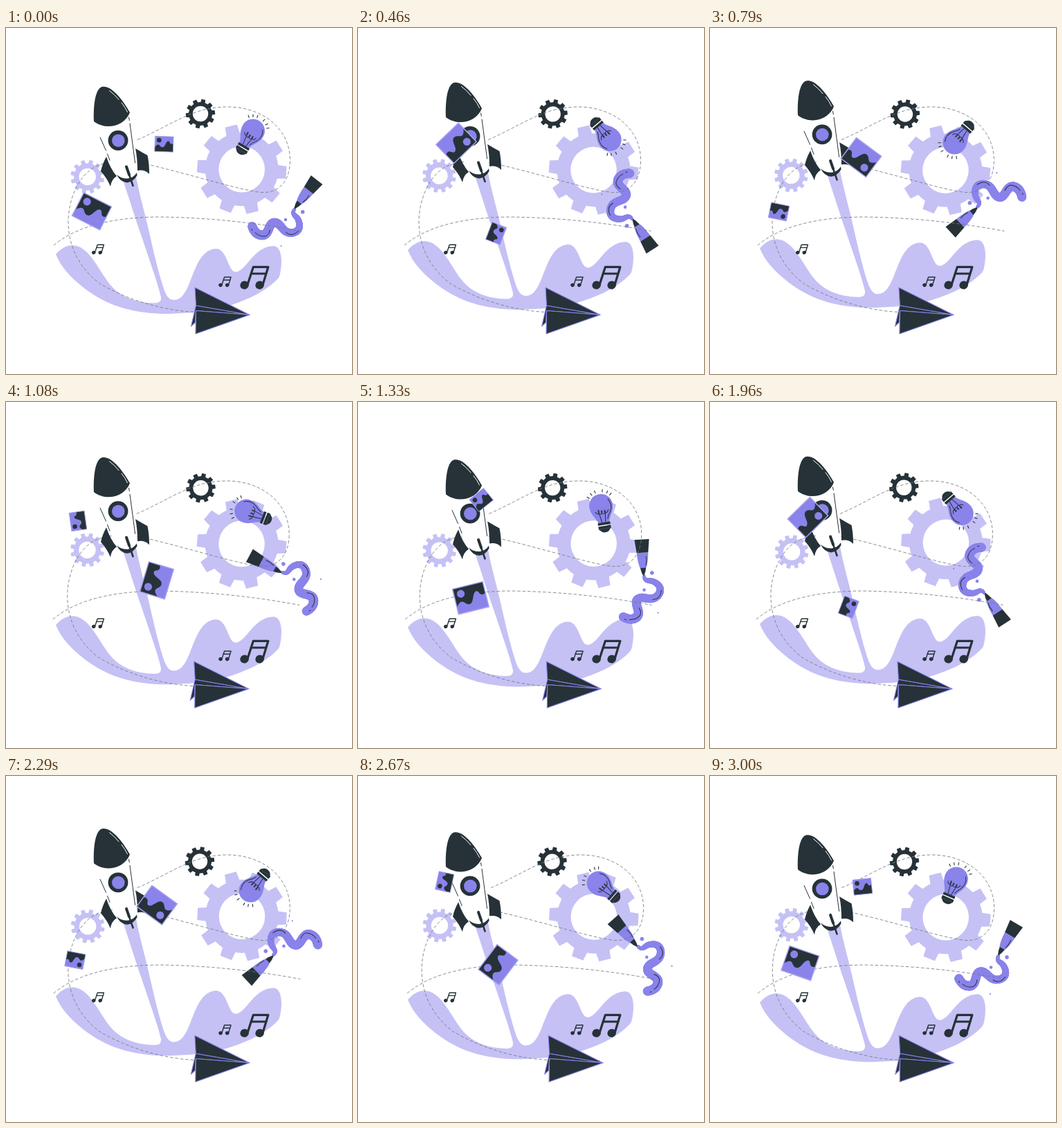
An HTML page with a canvas that plays this animation: 500x500 px, repeating every 3040 ms.

```html
<!DOCTYPE html>
<html lang="en">
<head>
<meta charset="utf-8">
<title>Creative rocket</title>
<style>
html, body { margin: 0; width: 100%; height: 100%; overflow: hidden; background: #fff; }
canvas { display: block; width: 500px; height: 500px; }
</style>
</head>
<body>
<canvas id="stage" width="500" height="500"></canvas>
<script>
const ctx = document.getElementById('stage').getContext('2d');
const DARK = '#263238', PURPLE = '#8a83ea', PALE = '#c5c1f5', WHITE = '#fff';
const LOOP = 3040, STEP = 1000 / 24, LAST = 72, TAU = Math.PI * 2;
const START = 0.02; // cycle position when the loop begins

function fill(d, color) {
  ctx.fillStyle = color;
  ctx.fill(new Path2D(d));
}
function line(d, color, width, cap = 'round') {
  ctx.strokeStyle = color;
  ctx.lineWidth = width;
  ctx.lineCap = cap;
  ctx.lineJoin = 'round';
  ctx.stroke(new Path2D(d));
}
function dot(x, y, r, color) {
  ctx.fillStyle = color;
  ctx.beginPath();
  ctx.arc(x, y, r, 0, TAU);
  ctx.fill();
}
function group(draw, x, y, deg = 0, scale = 1) {
  ctx.save();
  ctx.translate(x, y);
  ctx.rotate(deg * Math.PI / 180);
  ctx.scale(scale, scale);
  draw();
  ctx.restore();
}
function spin(draw, cx, cy, deg) {
  group(() => { ctx.translate(-cx, -cy); draw(); }, cx, cy, deg);
}

// Linear interpolation through [position, value] pairs
function track(keys, x) {
  let k = 1;
  while (k < keys.length - 1 && x > keys[k][0]) k++;
  const [x0, y0] = keys[k - 1], [x1, y1] = keys[k];
  return y0 + (y1 - y0) * (x - x0) / (x1 - x0);
}
const PACE = [[0, START], [11, .323], [26, .742], [39, 1.098], [55, 1.545], [64, 1.798], [72, 1.998]];
const SHAKE = [0, -1, 2, -4, 4, -4, 4, -4, 2, -1, 0].map((x, k) => [k / 10, x]);
const FLOAT = [[0, 0], [.5, -10], [1, 0]];
const WIND = [[0, 0], [.25, 1], [.75, -1], [1, 0]];

function gear(x, y, hole, root, tip, teeth, offset, color) {
  ctx.beginPath();
  for (let k = 0; k < teeth; k++) {
    const a = (offset + 360 * k / teeth) * Math.PI / 180;
    const w = TAU / teeth;
    for (const [r, da] of [[root, -.3], [tip, -.215], [tip, .215], [root, .3]]) {
      ctx.lineTo(x + r * Math.cos(a + da * w), y + r * Math.sin(a + da * w));
    }
    ctx.arc(x, y, root, a + .3 * w, a + .7 * w);
  }
  ctx.closePath();
  ctx.moveTo(x + hole, y);
  ctx.arc(x, y, hole, 0, TAU, true);
  ctx.fillStyle = color;
  ctx.fill();
}
function gears() {
  gear(340.7, 204.2, 33.3, 53, 65, 10, 4, PALE);
  gear(117.7, 215, 12.2, 19.5, 24.5, 12, 13, PALE);
  gear(281, 124, 11.2, 17, 21.3, 10, -6, DARK);
}

function trail() {
  fill(`M72 327C78 320 86 314 96 314C119 314 133 348 149 369C164 388 186 397 214 397.5
    Q225 398 224 389C219 367 206 332 196.500 303C186 273 178 246 168 217L188 215
    C192 238 201 268 208 300C217 340 224 366 230 382Q235 394 243 393
    C270 393 267 323 302 319C320 317 320 352 332 352.5C347 352 358 315 387 315
    C398 316 399 335 397.500 346Q396 358 394 361C374 383 341 397 305 406
    C278 411 253 413 226 413C170 411 140 396 113 376C93 360 79 345 72 327Z`, PALE);
}

function rocket() {
  fill('M127 134L136 158L151 195Q160 219 174 222Q187 219 190 207L186 165L179 122Z', WHITE);
  fill('M145 186Q139 197 137 207Q146 217 151 229Q152 219 160 214Q151 204 145 186Z', DARK);
  fill('M187 174Q197 180 204.500 184Q207 196 207 211Q200 204 190 206Q190 188 187 174Z', DARK);
  fill('M160 212Q167 218 176 217.500Q185 216 189 209L189.500 213Q184 222.500 175 223.500Q165 222.500 160 212Z', DARK);
  line('M174 200.500L178 212', DARK, 4);
  line('M178 212L183.500 228', DARK, 2.6);
  line('M136 158L144.500 177M146.500 182L150 191', DARK, 1);
  line('M177.500 129L178.300 133.500M179 138L186.600 195', DARK, 1);
  fill('M127 135C126 112 129 85 140.500 84.800C154 84 170 106 179 122C172 141 146 149 127 135Z', DARK);
  line('M149.500 90.500Q157 96 163 103.500M167 108Q172 114 175.500 121.500', WHITE, 1);
  dot(162, 162.5, 14.4, DARK);
  dot(162.3, 162.7, 9.3, PURPLE);
}

function flightLine() {
  ctx.setLineDash([4.6, 2.8]);
  line(`M190 161.500C225 147 262 121 297 116C360 105 411 140 410.500 192
    C410 222 394 239 369 237.500C340 235 265 211 204 197C172 189 145 193 130 200
    C107 211 90 245 90 280C90 320 110 350 135 369C168 389 220 408 273 410.500
    M69 314C95 292 140 274 220 273C300 274 370 283 425.500 293.500`, '#747b80', .85, 'butt');
  ctx.setLineDash([]);
}
function plane() {
  const parts = [
    'M274.500 401L267.500 431L273.500 425.500L274.500 408.500L352 414.500Z',
    'M273 375L352 414.500L274.500 401Z',
    'M274.500 408.500L352 414.500L274 442Z'
  ];
  for (const d of parts) {
    fill(d, DARK);
    line(d, PURPLE, 1.1);
  }
}

function picture(sky, land) {
  ctx.fillStyle = sky;
  ctx.fillRect(-22.5, -18.7, 45, 37.4);
  dot(-12.4, -9.2, 5.6, land);
  fill(`M-22.500 8.500C-18 2.500 -14 0 -10.500 4S-5 9 -1 7.500C4 4 4 -6 9.500 -7.500
    C14 -8 13 -2 17 -1S20 -3 22.500 -1V18.700H-22.500Z`, land);
  ctx.strokeStyle = '#a8a2f0';
  ctx.lineWidth = 1.5;
  ctx.strokeRect(-22.5, -18.7, 45, 37.4);
}
function pictures() {
  group(() => picture(DARK, PURPLE), 124, 264.8, 27);
  group(() => picture(PURPLE, DARK), 228.4, 167.7, 2, .59);
}

function bulb() {
  group(() => {
    fill('M-11.500 17C-12.500 9 -20.500 4 -20.500 -8A17 17 0 0 1 13.500 -8C13.500 4 5 9 4.500 17Z', PURPLE);
    fill('M-12.500 16.500H5.500V20H-12.500Z', DARK);
    fill('M-12.500 21.500H5.500V25.500L3 28Q1 31 -3.500 31Q-8 31 -10 28L-12.500 25.500Z', DARK);
    line('M-12 25.500H5', '#4a5459', .7);
    line('M-6 16L-8 3M-1 16L1 3', DARK, 1);
    line('M-13 0Q-10 5 -8 2Q-7 -3 -9 -2Q-9 5 -5 4Q-2 1 -4 -1Q-6 3 -2 4Q2 4 1 -1Q-1 1 1 3Q4 4 6 -1', DARK, 1);
    line('M8 -16Q14 -7 8 3Q4 8 3 12', DARK, 1);
    for (const a of [-138, -121, -104, -75, -56, -41]) {
      const c = Math.cos(a * Math.PI / 180), s = Math.sin(a * Math.PI / 180);
      line(`M${-3.5 + 20 * c} ${-8 + 20 * s}L${-3.5 + 23.5 * c} ${-8 + 23.5 * s}`, DARK, 1.1);
    }
  }, 355.9, 157.2, 31);
}

// Tapering stroke along one cubic curve
function ribbon(x0, y0, x1, y1, x2, y2, x3, y3, w0, w1) {
  for (let k = 0; k <= 40; k++) {
    const t = k / 40, u = 1 - t;
    const mix = (a, b, c, d) => u * u * u * a + 3 * u * u * t * b + 3 * u * t * t * c + t * t * t * d;
    dot(mix(x0, x1, x2, x3), mix(y0, y1, y2, y3), (w0 * u + w1 * t) / 2, PURPLE);
  }
}
function brush() {
  ribbon(417, 262, 411, 270, 421, 271, 423, 279, 4.5, 9);
  ribbon(423, 279, 426, 288, 423, 295, 413, 296, 9, 11.5);
  ribbon(413, 296, 399, 297, 398, 281, 388, 281, 11.5, 12.5);
  ribbon(388, 281, 379, 281, 381, 299.5, 370, 299.5, 12.5, 13.5);
  ribbon(370, 299.5, 362, 299, 358, 293, 355.7, 286.5, 13.5, 13);
  line('M355 290.500L356 292.500M360 295.500Q366 302 375 301Q380 299 381.500 292', DARK, 1);
  line('M404.500 295.500Q413 303 422.500 293.500', DARK, 1);
  dot(404, 277, 2.3, PURPLE);
  dot(428.7, 265.7, 2.8, PURPLE);
  dot(397.6, 315, 1.1, PURPLE);
  group(() => {
    fill('M8.500 -3.500Q16 -7.500 32.500 -8.300V8.300Q16 7.500 8.500 3.500Z', PURPLE);
    fill('M32.500 -8.300L51.700 -10.600V10.600L32.500 8.300Z', DARK);
    fill('M10.500 -4Q5 -3.500 0 -1Q-1 0 0 1Q5 3.500 10.500 4Z', DARK);
    line('M14 4Q20 6 27 5', DARK, 1);
  }, 417.3, 260.3, -52);
}

function note() {
  for (const x of [0, 22]) {
    group(() => {
      ctx.fillStyle = DARK;
      ctx.beginPath();
      ctx.ellipse(0, 0, 6.4, 5.9, -.4, 0, TAU);
      ctx.fill();
    }, x, 0);
  }
  line('M4.500 -1L12.700 -26.200H34.200L26.500 -1', DARK, 3.2);
  line('M9.500 -16.500H31', DARK, 3.2);
}

function render(step) {
  const p = track(PACE, step), c = p % 1;
  const turn = (p - START) * 360;
  const rise = track(FLOAT, c) - track(FLOAT, START);
  const shake = track(SHAKE, c) - track(SHAKE, START);
  const sway = track(WIND, (p / 2) % 1) - track(WIND, START / 2);

  ctx.fillStyle = WHITE;
  ctx.fillRect(0, 0, 500, 500);
  spin(gears, 249, 185.5, sway);
  group(trail, 0, rise);
  group(note, 344.7, 371.5);
  group(note, 126.7, 324.5, 0, .43);
  group(note, 310, 371.5, 0, .44);
  spin(brush, 401.5, 261.5, turn);
  group(() => { flightLine(); plane(); }, shake, 0);
  group(rocket, 0, rise);
  spin(bulb, 355.9, 157.2, turn);
  spin(pictures, 168, 222, turn);
}

let origin = null;
function tick(now) {
  if (origin === null) origin = now;
  const t = Math.floor(((now - origin) % LOOP) / 10) * 10;
  render(Math.min(LAST, Math.floor((t + 4.99) / STEP)));
  requestAnimationFrame(tick);
}
render(0);
requestAnimationFrame(tick);
</script>
</body>
</html>
```
